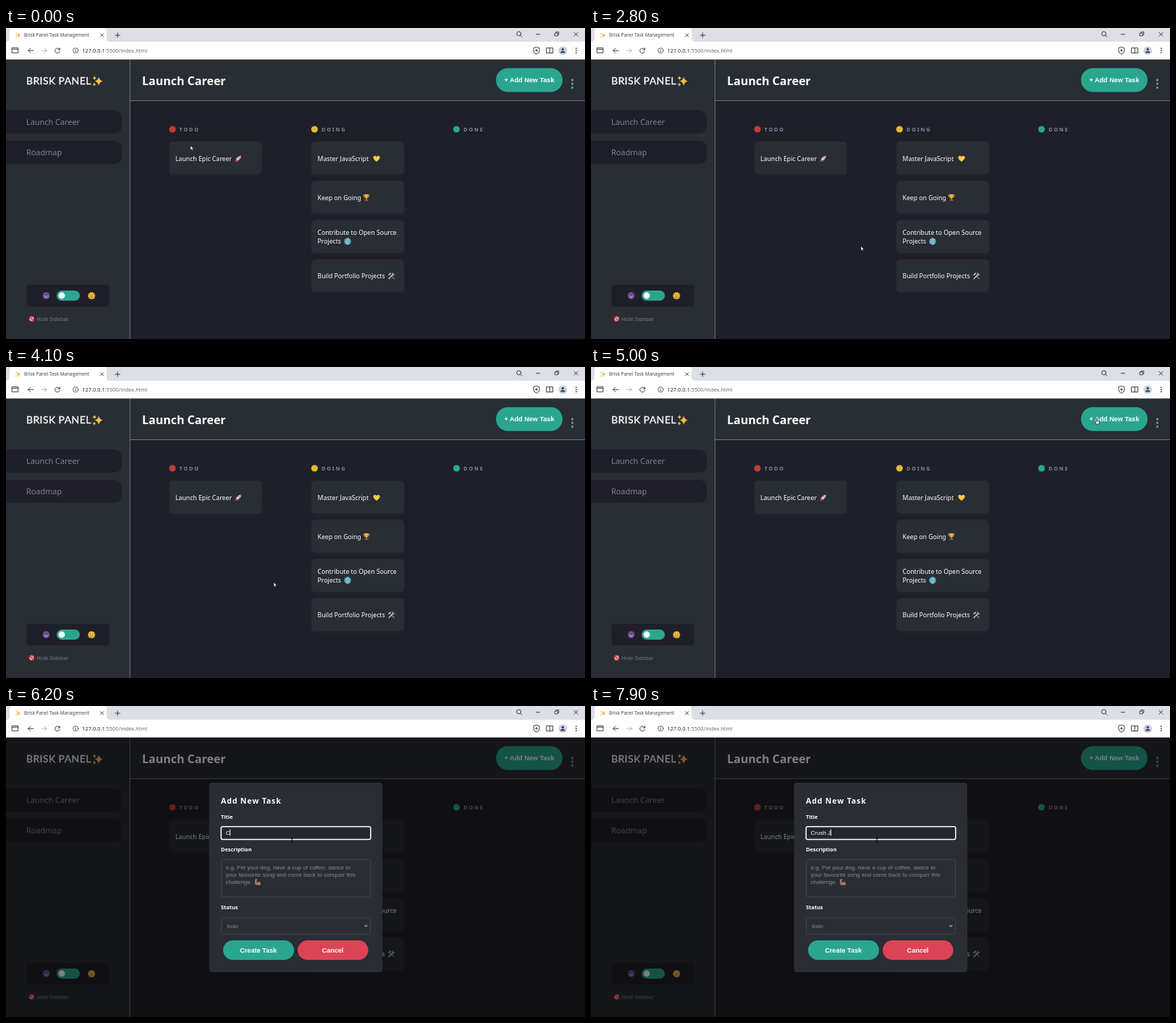
These frames come from a looping animation (800x430 px, 8 s). An HTML page:

```html
<!DOCTYPE html>
<html lang="en">
<head>
<meta charset="utf-8">
<title>Task board</title>
<style>
html, body { margin: 0; width: 100%; height: 100%; overflow: hidden; background: #1f1f29; }
svg { display: block; }
text { font-family: "Noto Sans", sans-serif; fill: #fff; white-space: pre; }
.arial text, text.arial { font-family: "Liberation Sans", Arial, sans-serif; }
.panel { fill: #292d34; }
.dark { fill: #1f1f29; }
.green { fill: #2aa68f; }
.nav text { font-size: 10.9px; font-weight: 500; fill: #7c8492; }
.heads text { font-size: 7px; font-weight: 700; letter-spacing: 2px; fill: #828fa3; }
.cards text { font-size: 8.7px; }
.cards rect { filter: drop-shadow(0 2px 3px rgba(54, 78, 126, .12)); }
.btn { font-size: 9.1px; font-weight: 700; text-anchor: middle; }
.label { font-size: 7.4px; font-weight: 700; }
.field { fill: none; stroke: #454a54; stroke-width: .8; }
.hint { font-size: 8px; }
.hint text { fill: #858a93; }
.icons { fill: none; stroke: #3c4043; stroke-width: 1; stroke-linecap: round; stroke-linejoin: round; }
</style>
</head>
<body>
<svg width="800" height="430" viewBox="0 0 800 430">
  <defs>
    <symbol id="spark" viewBox="0 0 10 10">
      <path fill="#f6bd45" d="M6.1 .8Q6.7 4.2 9.9 5 6.7 5.8 6.1 9.4 5.5 5.8 2.4 5 5.5 4.2 6.1 .8ZM2.2 0Q2.4 1.8 4 2.1 2.4 2.4 2.2 4.1 2 2.4.4 2.1 2 1.8 2.2 0ZM2 6.2Q2.2 7.8 3.7 8 2.2 8.3 2 9.9 1.8 8.3.3 8 1.8 7.8 2 6.2Z"/>
    </symbol>
    <symbol id="rocket" viewBox="0 0 10 10">
      <path fill="#d0394c" d="M4.2 3.2 1.4 4.4.6 6.6 3 6ZM6.8 5.8 5.6 8.6 3.4 9.4 4 7Z"/>
      <path fill="#f3a833" d="M2.3 6.5.3 9.7 3.5 7.7Z"/>
      <path fill="#d9dde2" d="M2.4 6.3Q4.2 1.6 8 1.3L8.7 2Q8.4 5.8 3.7 7.6Z"/>
      <path fill="#d0394c" d="M7 1.6Q8.3.6 9.8.2 9.5 1.7 8.4 3Z"/>
      <circle cx="6" cy="4" r="1" fill="#4d8cb5"/>
    </symbol>
    <symbol id="heart" viewBox="0 0 10 10">
      <path fill="#f6cb45" d="M5 9.4C1.8 7 .2 5.2.2 3.2.2.4 3.8-.1 5 2.4 6.2-.1 9.8.4 9.8 3.2 9.8 5.2 8.2 7 5 9.4Z"/>
    </symbol>
    <symbol id="cup" viewBox="0 0 10 10">
      <path fill="none" stroke="#e39a2d" d="M2.6 1.4H.9Q.9 4.6 3.4 5M7.4 1.4H9.1Q9.1 4.6 6.6 5"/>
      <path fill="#f2b13b" d="M2.3.2H7.7Q7.8 5 5.6 6V7.6H4.4V6Q2.2 5 2.3.2Z"/>
      <path fill="#8b5a35" d="M2.6 7.5H7.4V9.8H2.6Z"/>
    </symbol>
    <symbol id="globe" viewBox="0 0 10 10">
      <circle cx="5" cy="5" r="4.8" fill="#3f8fae"/>
      <path fill="none" stroke="#b9dfe8" stroke-width=".6" d="M.3 5H9.7M5 .2V9.8M1.3 2.4Q5 4 8.7 2.4M1.3 7.6Q5 6 8.7 7.6M5 .3Q.4 5 5 9.7M5 .3Q9.6 5 5 9.7"/>
    </symbol>
    <symbol id="tools" viewBox="0 0 10 10">
      <path fill="none" stroke="#a56a4c" stroke-width="1.5" d="M9 9.3 4 3.6"/>
      <path fill="none" stroke="#b9c3cc" stroke-width="1.6" d="M1.2 9 7.4 2.8M1 3.7 4.4.9"/>
      <path fill="none" stroke="#b9c3cc" stroke-width="1.2" d="M7.5.6Q6 2 7.2 3 8.6 4 9.6 2.5"/>
    </symbol>
    <symbol id="arm" viewBox="0 0 10 10">
      <path fill="#b0766f" d="M1.3.8 4 .5 4.6 2.2 3.1 3.2 4 6Q6 3.6 8.3 5 10.1 6.6 9.4 8.5 6 10.2 1.6 9 .1 5 1.3.8Z"/>
      <path fill="none" stroke="#7c5559" stroke-width=".7" d="M4 6Q5.1 6 5.6 7.1M1.4 3.5H3"/>
    </symbol>
    <symbol id="imp" viewBox="0 0 10 10">
      <circle cx="5" cy="5" r="4.8" fill="#75509b"/>
      <path fill="none" stroke="#2d2340" d="M1.8 3.4 4.2 4.6M8.2 3.4 5.8 4.6"/>
      <path fill="none" stroke="#e8dff0" stroke-width=".8" d="M2.6 5H3.8M6.2 5H7.4M3.2 7.1H6.8"/>
    </symbol>
    <symbol id="sun" viewBox="0 0 10 10">
      <circle cx="5" cy="5" r="4.2" fill="#f3c33e"/>
      <circle cx="5" cy="5" r="4.5" fill="none" stroke="#e8a535" stroke-width="1" stroke-dasharray="1.4 .95"/>
      <path fill="none" stroke="#6d4a24" stroke-width=".9" d="M2.8 4.1H4M6 4.1H7.2M3.2 6.3Q5 8 6.8 6.3"/>
    </symbol>
    <symbol id="ban" viewBox="0 0 10 10">
      <circle cx="5" cy="5" r="4" fill="#d9c4c7" stroke="#c8323f" stroke-width="1.8"/>
      <path stroke="#c8323f" stroke-width="1.7" d="M2.2 2.2 7.8 7.8"/>
    </symbol>
  </defs>

  <!-- page -->
  <rect class="dark" width="800" height="430"/>
  <path class="panel" d="M0 43H171V430H0ZM171 43H800V100H171Z"/>
  <path d="M171.3 43V430M171 100.5H800" stroke="#777d83" stroke-width=".9"/>
  <text x="28" y="78" style="font:14px Lato,sans-serif;letter-spacing:.4px" stroke="#fff" stroke-width=".3">BRISK PANEL</text>
  <use href="#spark" x="119" y="66" width="15" height="15"/>
  <g class="nav">
    <path class="dark" d="M0 114H148Q160 114 160 126V134Q160 146 148 146H0ZM0 156H148Q160 156 160 168V176Q160 188 148 188H0Z"/>
    <text x="28" y="134.4">Launch Career</text>
    <text x="28" y="176.4">Roadmap</text>
  </g>
  <rect class="dark" x="28.5" y="355" width="114" height="30" rx="4"/>
  <rect class="green" x="70" y="363" width="32" height="14" rx="7"/>
  <circle cx="77" cy="370" r="4.4" fill="#fff"/>
  <use href="#imp" x="50.5" y="365" width="10" height="10"/>
  <use href="#sun" x="113" y="365" width="10.5" height="10.5"/>
  <use href="#ban" x="31.2" y="398" width="8.4" height="8.4"/>
  <text x="42.3" y="405" font-size="7.4" style="fill:#767e8b">Hide Sidebar</text>

  <text x="188" y="78.5" font-size="16" font-weight="700">Launch Career</text>
  <rect class="green" x="677" y="55.5" width="92" height="33" rx="16.5"/>
  <text class="arial btn" x="723" y="75">+ Add New Task</text>
  <path d="M782.5 72V82.6" stroke="#828a96" stroke-width="3.3" stroke-linecap="round" stroke-dasharray="0 5.2"/>

  <g class="heads">
    <circle cx="230" cy="140" r="4.6" fill="#c53c38"/><text x="239.5" y="143">TODO</text>
    <circle cx="426.3" cy="140" r="4.6" fill="#e2ba30"/><text x="436" y="143">DOING</text>
    <circle cx="622.5" cy="140" r="4.6" fill="#2aa68f"/><text x="632.3" y="143">DONE</text>
  </g>
  <g class="cards">
    <g class="panel">
      <rect x="225.5" y="157" width="128" height="45.5" rx="5.5"/>
      <rect x="422" y="157" width="128" height="45.5" rx="5.5"/>
      <rect x="422" y="211.3" width="128" height="45.5" rx="5.5"/>
      <rect x="422" y="265.5" width="128" height="45.5" rx="5.5"/>
      <rect x="422" y="319.8" width="128" height="45.5" rx="5.5"/>
    </g>
    <text x="234" y="183.6">Launch Epic Career</text>
    <text x="430.5" y="183.6">Master JavaScript</text>
    <text x="430.5" y="237.8">Keep on Going</text>
    <text x="430.5" y="285.5">Contribute to Open Source</text>
    <text x="430.5" y="298">Projects</text>
    <text x="430.5" y="346.3">Build Portfolio Projects</text>
    <use href="#rocket" x="316" y="175.5" width="10" height="10"/>
    <use href="#heart" x="507" y="176" width="10" height="9.5"/>
    <use href="#cup" x="493" y="229.5" width="10" height="10"/>
    <use href="#globe" x="467" y="290" width="10" height="10"/>
    <use href="#tools" x="527.5" y="338" width="10" height="10"/>
  </g>

  <!-- dialog -->
  <g id="dialog">
    <rect y="43" width="800" height="387" fill-opacity=".5"/>
    <rect x="280.5" y="106" width="239.5" height="262" rx="4" fill="#2a2d34"/>
    <text x="297" y="135" font-size="10.5" font-weight="600" letter-spacing=".9">Add New Task</text>
    <text class="label" x="297" y="155.6">Title</text>
    <text class="label" x="297" y="201.4">Description</text>
    <text class="label" x="297" y="281.4">Status</text>
    <rect class="field" x="297.5" y="167.5" width="206" height="16.5" rx="2"/>
    <rect class="field" x="297.5" y="212.5" width="206" height="51.5" rx="2"/>
    <rect class="field" x="297.5" y="293" width="206" height="22.5" rx="2"/>
    <path d="M495.3 303 497.3 305 499.3 303" fill="none" stroke="#a0a4aa" stroke-width="1.1"/>
    <g id="focus">
      <rect x="297.2" y="166.7" width="206.6" height="17.8" rx="2.2" fill="#24272e" stroke="#fff" stroke-width="1.5"/>
      <rect id="caret" y="170.5" width=".9" height="9" fill="#fff"/>
    </g>
    <g class="arial hint">
      <text id="hint" x="303.5" y="178">e.g. Take a little break</text>
      <text id="typed" x="303.5" y="178" style="fill:#fff"></text>
      <text x="303.5" y="226">e.g. Pet your dog, have a cup of coffee, dance to</text>
      <text x="303.5" y="235.6">your favourite song and come back to conquer this</text>
      <text x="303.5" y="246.2">challenge.</text>
      <text x="305.5" y="307">todo</text>
    </g>
    <use href="#arm" x="343" y="238.8" width="9.5" height="9.5"/>
    <rect class="green" x="300" y="324" width="98" height="27" rx="13.5"/>
    <rect x="403" y="324" width="97.5" height="27" rx="13.5" fill="#dd4357"/>
    <text class="arial btn" x="348.7" y="340.6">Create Task</text>
    <text class="arial btn" x="451.5" y="340.6">Cancel</text>
  </g>

  <!-- browser -->
  <rect width="800" height="43.5" fill="#fff"/>
  <path d="M0 0H800V19H144Q139 19 139 14V4Q139 0 135 0H9Q5 0 5 4V14Q5 19 0 19Z" fill="#dcdfe6"/>
  <use href="#spark" x="12.5" y="6" width="8" height="8"/>
  <text x="25" y="12.3" font-size="6.4" style="fill:#45484c">Brisk Panel Task Management</text>
  <text x="105.3" y="34.2" font-size="7.4" style="fill:#25282b">127.0.0.1<tspan fill="#686c71">:5500/index.html</tspan></text>
  <g class="icons">
    <path d="M130.5 7.8 134.7 12M134.7 7.8 130.5 12M151 10H157.4M154.2 6.8V13.2M711 10.4 713 12.4M732.5 8.7H737.5M785 6.2 790 11.2M790 6.2 785 11.2"/>
    <circle cx="708.6" cy="7.9" r="3"/>
    <path d="M758.5 7H762.3V10.8H758.5ZM760 7V5.5H763.8V9.3H762.3" stroke-width=".9"/>
    <path d="M8.5 27.5H16.8V34.3H8.5ZM8.5 29.4H16.8M38 31.2H30.6M33.8 28 30.6 31.2 33.8 34.4M73.6 29.1A3.4 3.4 0 1 0 74.3 32.4M74.4 27.8V30.2H72"/>
    <path d="M49.3 31.2H56.4M53.4 28.2 56.4 31.2 53.4 34.2" stroke="#b0b3b7"/>
    <circle cx="96.2" cy="31.2" r="3.6" stroke-width=".8"/>
    <path d="M96.2 31V33M96.2 29.3V29.4" stroke-width=".9"/>
    <path d="M733 26.4 737 27.8V31Q737 34.6 733 36.3 729 34.6 729 31V27.8ZM731.4 31H734.6M733 29.4V32.6"/>
    <path d="M747 27.6H755.6V34.6H747ZM751.3 27.6V34.6"/>
    <path d="M787.8 28.2V34.4" stroke-width="1.8" stroke-dasharray="0 3"/>
  </g>
  <circle cx="769.3" cy="31.2" r="6" fill="#cdd2df"/>
  <path d="M766 34.4Q766 31.8 769.3 31.8T772.6 34.4Z" fill="#3c4660"/>
  <circle cx="769.3" cy="29.5" r="1.7" fill="#3c4660"/>

  <g id="pointer">
    <path id="arrow" d="M0 0V5.4L1.3 4.3 2.2 6.2 3.1 5.8 2.2 4H3.9Z" fill="#fff" stroke="#111" stroke-width=".3"/>
    <path id="hand" d="M-.9-3.2Q-.2-4 .3-3V-.7L2.9 0Q3.5.3 3.2 1.8L2.6 4H-.9L-2.8 1.1Q-2.5.2-1.5.9L-.9 1.2Z" fill="#fff" stroke="#111" stroke-width=".7"/>
    <path id="beam" d="M-1.1-3.5H1.1M0-3.5V3.5M-1.1 3.5H1.1" fill="none" stroke="#000" stroke-width="1"/>
  </g>
</svg>
<script>
const LOOP = 8000, STEP = 100;
const $ = id => document.getElementById(id);
const show = (id, on) => $(id).style.display = on ? "" : "none";

// Pointer moves: start, end, x, y
const moves = [
  [0, 0, 255, 163], [0, 100, 373, 302], [3200, 3400, 372, 301],
  [3700, 4100, 370, 298], [4300, 5000, 699, 75], [5300, 5400, 448, 174],
  [5500, 5700, 395, 185]
];
const keys = [[6200, "C"], [6400, "Cr"], [6500, "Cru"], [6700, "Crus"],
  [6900, "Crush"], [7500, "Crush "], [7900, "Crush J"]];

function pointerAt(t) {
  let x = 0, y = 0;
  for (const [start, end, toX, toY] of moves) {
    if (t < start) break;
    const p = end > start ? Math.min(1, (t - start) / (end - start)) : 1;
    const k = p * p * (3 - 2 * p);
    x += (toX - x) * k;
    y += (toY - y) * k;
  }
  return [x, y];
}

function draw(now) {
  const t = Math.floor((now % LOOP) / STEP) * STEP;
  const open = t >= 5400, focused = t >= 5900;
  const [x, y] = pointerAt(t);
  const overButton = !open && x > 677 && y < 89;
  $("pointer").setAttribute("transform", `translate(${x} ${y})`);
  show("arrow", !open && !overButton);
  show("hand", overButton);
  show("beam", open);
  show("dialog", open);
  show("focus", focused);

  let word = "";
  for (const [time, value] of keys) if (t >= time) word = value;
  $("typed").textContent = word;
  show("hint", !word);
  show("caret", t < 7400 || t >= 7500);
  if (open) $("caret").setAttribute("x", 303.4 + (word ? $("typed").getComputedTextLength() : 0));
}

const begin = performance.now();
function tick() {
  draw(performance.now() - begin);
  requestAnimationFrame(tick);
}
tick();
</script>
</body>
</html>
```
